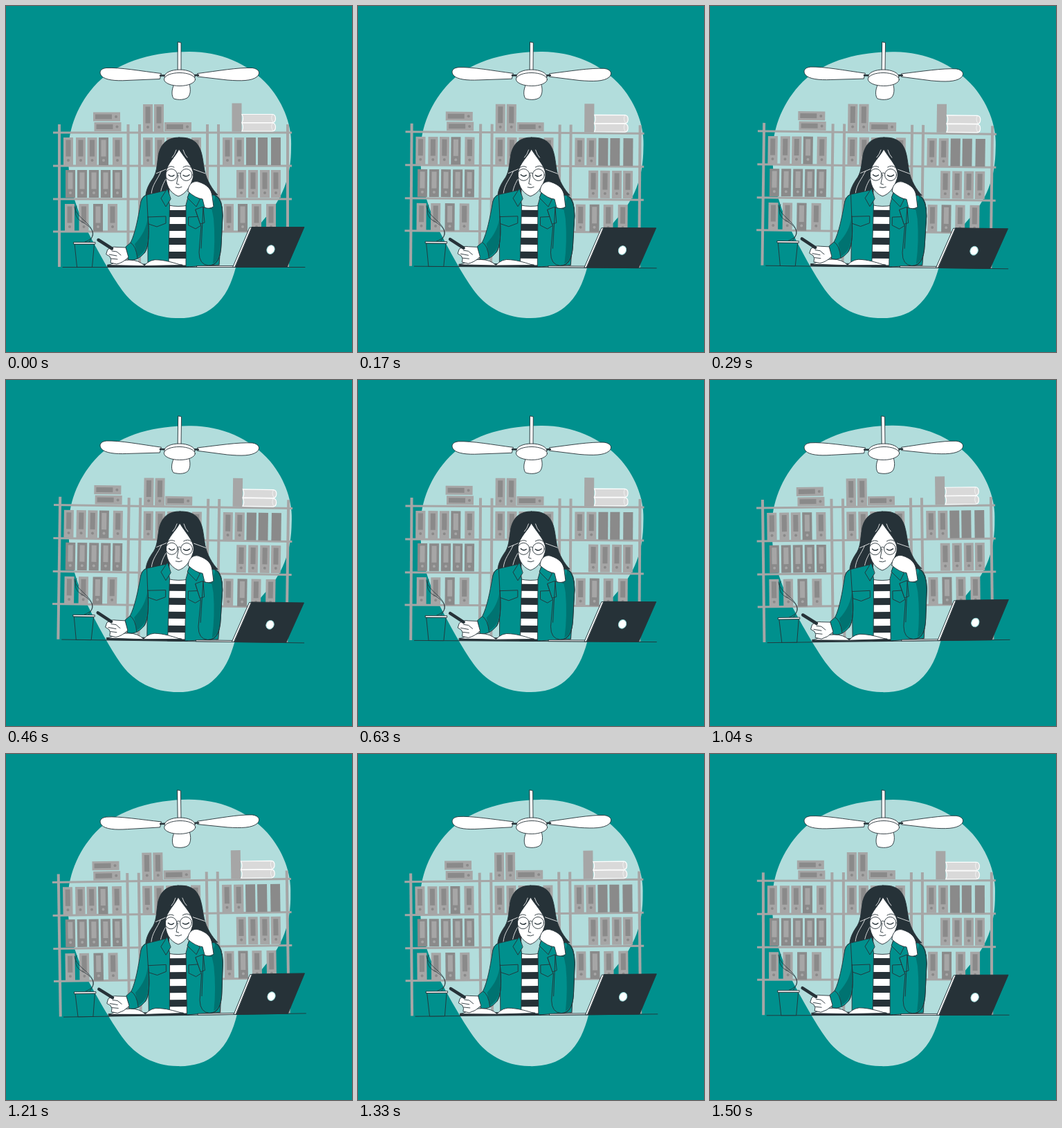
Recreate the animation shown at these times as an HTML page. Size 500 by 500 pixels, loop 1540 ms.

```html
<!DOCTYPE html>
<html lang="en">
<head>
<meta charset="utf-8">
<title>Studying</title>
<style>
html, body { margin: 0; width: 100%; height: 100%; overflow: hidden; background: #00908d; }
svg { display: block; width: 100%; height: 100%; }
.line { fill: none; }
.ink { fill: #263238; }
.teal { fill: #00908d; }
.shade { fill: #007371; }
.pale { fill: #b2dddc; }
.white { fill: #fff; }
.outlined { stroke: #263238; stroke-width: .9; stroke-linejoin: round; stroke-linecap: round; }
</style>
</head>
<body>
<svg viewBox="0 0 500 500">
  <g class="sway" data-pivot="251 258">
    <path class="pale" d="M265 66C308 66 350 82 380 116C402 142 414 175 412 205C412 243 402 273 380 300C358 325 340 349 332 378C326 400 318 420 300 435C286 447 266 452 245 451C210 450 184 433 168 411C152 389 133 355 116 322C98 286 89 250 90 212C90 177 104 140 132 111C166 77 220 66 265 66Z"/>
  </g>

  <g class="sway" data-pivot="240.5 258">
    <g id="shelves"></g>
    <g fill="#d9d9d9" stroke="#fff" stroke-width="1.2">
      <path id="book" d="M341 156.500H385Q389.500 157 389.500 162.500T385 168.500H341Q344 162.500 341 156.500Z"/>
      <use href="#book" y="12.500"/>
      <path class="line" d="M385 157Q382 162 386 168M385 169.500Q382 175 386 180.500" stroke-width=".6"/>
    </g>
  </g>

  <g class="sway outlined" data-pivot="251 93">
    <path class="white" d="M248.500 52L253 53V96H248.500Z"/>
    <path class="white" d="M243 113C239 121 239 130 242.500 134C249 136 258 136 263 132C267 127 267 120 265 113Z"/>
    <path class="white" d="M224 97.500C195 94 165 88.500 145 89.500C136 90.500 134 96 138 101C143 107 158 108.500 175 107.500L222 105.500Z"/>
    <path class="white" d="M277 97.500C305 94 336 88.500 356 89.500C366 91 368 97 363 102C355 108.500 340 108.500 320 107L277 102Z"/>
    <path class="line" d="M223 100.500H230M273 100H278" stroke-width="2.500"/>
    <ellipse class="white" cx="251" cy="102" rx="22" ry="10"/>
    <ellipse class="white" cx="251" cy="106" rx="22.500" ry="9.500"/>
  </g>

  <g class="sway outlined" data-pivot="257 284">
    <path class="line" d="M82 377.500H432"/>

    <!-- Hair and neck -->
    <path class="ink" d="M250 190C234 190 225 198 221 212C218 225 219 238 213 248C206 258 203 265 202 273H306C298 265 290 252 287 238C284 222 284 208 275 198C268 191 260 190 250 190Z"/>
    <path class="line" d="M224 239C219 251 211 258 210 272M231 250C225 260 224 266 223 272" style="stroke:#fff;stroke-width:.8"/>
    <path class="pale" d="M236 260L235 291H264L266 262Z"/>

    <!-- Striped shirt -->
    <path class="white" d="M235 288Q249 291 263 288V377H235Z"/>
    <path class="line" d="M235 300H263M235 320H263M235 340H263M235 360H263" stroke-width="10" stroke-linecap="butt"/>
    <path class="line" d="M235 376H263" stroke-width="3"/>

    <!-- Jacket -->
    <path class="teal" d="M233 266L203 273Q195 275 194 290L205 330V371L235 373L236.500 288Z"/>
    <path class="teal" d="M266 266L304 274Q313 279 313 303L308 374L260 377V288Z"/>
    <path class="teal" d="M233 264L224 278L231 290L238 279Z"/>
    <path class="teal" d="M267 265L262 277L275 290L280 280Z"/>
    <path class="teal" d="M204 305L231 304V314L218 319L206 315Z"/>
    <path class="teal" d="M264 305L282 304V317L274 322L264 317Z"/>

    <!-- Writing arm -->
    <path class="teal" d="M203 273Q195 276 194 288C191 305 187 328 180 342L173 348L177 367Q190 369 200 357C207 348 207 325 205 304Z"/>
    <path class="shade" d="M205 304C203 320 198 331 186 344L190 363Q198 358 202 350C206 340 206 325 205 304Z" stroke="none"/>
    <path class="line" d="M180 342Q188 346 190 365M205 304C207 325 207 348 200 357"/>

    <!-- Resting arm -->
    <path class="teal" d="M303 274Q313 280 313 303L311 345Q310 375 293 375Q279 374 279 356L282 318L274 295L285 291L298 293L303 310Z"/>
    <path class="shade" d="M303 274Q313 280 313 303L311 345Q309 368 299 372Q303 340 300 307L297 291Z" stroke="none"/>
    <path class="line" d="M303 274Q313 280 313 303L311 345Q310 375 293 375"/>
    <path class="teal" d="M274 294L285 290L287 313L281 315Z"/>
    <path class="line" d="M285 291L282 350"/>

    <!-- Face -->
    <path class="white" d="M250 207C245 218 233 227 231 241C230 257 236 270 249 275C259 272 266 262 270 249C274 235 260 223 250 207Z"/>
    <path class="line" d="M233 234Q238 230 243 233M256 233Q262 229 267 233M249 244L246.500 257L250 258M245 262Q250 264 254 261.500"/>
    <path class="line" d="M235 244Q239 248 243 244.500M256 244.500Q260 248 265 244" stroke-width="1.400"/>
    <g class="line"><circle cx="239" cy="244" r="8.500"/><circle cx="260.500" cy="244" r="8.500"/><path d="M247.500 242Q250 240 252 242"/></g>
    <path class="line" d="M246 208Q244 215 240 219M256 208Q258 215 262 219M217 242L231 236M271 236L288 242" style="stroke:#fff;stroke-width:.8"/>

    <!-- Resting hand -->
    <path class="white" d="M263 268C263 258 270 252 278 254C291 258 297 265 298 275L300 290Q293 294 287 291L284 279Q274 278 263 268Z"/>

    <!-- Notebook -->
    <path class="ink" d="M147 374L200 373L255 374V377H147Z"/>
    <path class="white" d="M148 374.500C158 371 166 367 178 367Q192 367 200 375Q209 365 221 367C234 368 245 372 254 374.500L200 375.500Z"/>
    <path class="white" d="M276 375.500H331V377.500H276Z"/>

    <!-- Writing hand -->
    <path class="white" d="M147 352Q153 347 160 348.500L173 349L177 363Q169 371 160 373L151 371Q153 366 150 362L145 359Z"/>
    <path class="line" d="M133.500 338L153 350.500" stroke-width="4.500"/>
    <path class="line" d="M153 354L160 355L166 360M149 359L160 361M152 365L161 366"/>

    <!-- Cup -->
    <path class="line" d="M114 341C133 334 127 321 110 312C99 306 99 296 102 289M120 341C130 329 125 321 113 310C104 302 99 296 99 290" stroke-width=".8"/>
    <path class="teal" d="M99.500 344H127.500L124.500 377.500H103Z"/>
    <path class="white" d="M98 341.500H129V344H98Z"/>

    <!-- Laptop -->
    <path class="white" d="M352.500 320H356L332 377.500H328Z"/>
    <path class="ink" d="M355.500 319.500H431L406 377.500H331Z"/>
    <ellipse cx="382.500" cy="352" rx="5.500" ry="6.500" transform="rotate(25 382.500 352)" fill="#fff" style="stroke:#8fd6d5"/>
  </g>
</svg>
<script>
const LOOP = 1540;
const GREY = '#a6a6a6', DARK = '#8a8a8a';

const rect = (x, y, w, h, fill) =>
  `<rect x="${x}" y="${y}" width="${w}" height="${h}" fill="${fill}"/>`;

const binder = (x, y, body = GREY, label = DARK) =>
  rect(x, y, 14, 40, body) + rect(x + 3.500, y + 3.500, 7, 24, label) +
  `<circle cx="${x + 7}" cy="${y + 33}" r="2" fill="${label}"/>`;

const lying = (x, y) =>
  rect(x, y, 39, 13, GREY) + rect(x + 3, y + 3, 24, 7, DARK) +
  `<circle cx="${x + 33}" cy="${y + 6.500}" r="2" fill="${DARK}"/>`;

const row = (y, ...xs) => xs.map(x => binder(x, y)).join('');
const darkRow = (y, ...xs) => xs.map(x => binder(x, y, DARK, GREY)).join('');

document.getElementById('shelves').innerHTML =
  [75, 174.500, 191, 289, 305, 405].map(x => rect(x, 171, 4, 206, GREY)).join('') +
  [181.500, 229.500, 277.500, 324.500].map(y => rect(68, y, 345, 3, GREY)).join('') +
  row(142, 198, 214) + lying(126, 153.500) + lying(127.500, 168) + lying(229, 168) +
  rect(326.500, 140.500, 14, 41, GREY) +
  row(190, 83, 101, 117.500, 154, 198, 215, 232, 249, 268, 313, 330) +
  darkRow(190, 134) +
  [347, 364, 383].map(x => rect(x, 190, 14, 40, DARK)).join('') +
  darkRow(237, 86, 103, 120, 137, 154) + row(237, 333, 350, 367, 383) +
  row(286, 85, 105.500, 147, 315, 355, 376) + darkRow(286, 126, 335);

const groups = [...document.querySelectorAll('.sway')];

// Triangle wave: 0, +1 degree, 0, -1 degree over one loop.
function tilt(phase) {
  if (phase < 0.25) return phase * 4;
  if (phase < 0.75) return 2 - phase * 4;
  return phase * 4 - 4;
}

function draw() {
  const angle = tilt(performance.now() % LOOP / LOOP);
  for (const group of groups)
    group.setAttribute('transform', `rotate(${angle} ${group.dataset.pivot})`);
  requestAnimationFrame(draw);
}
draw();
</script>
</body>
</html>
```
